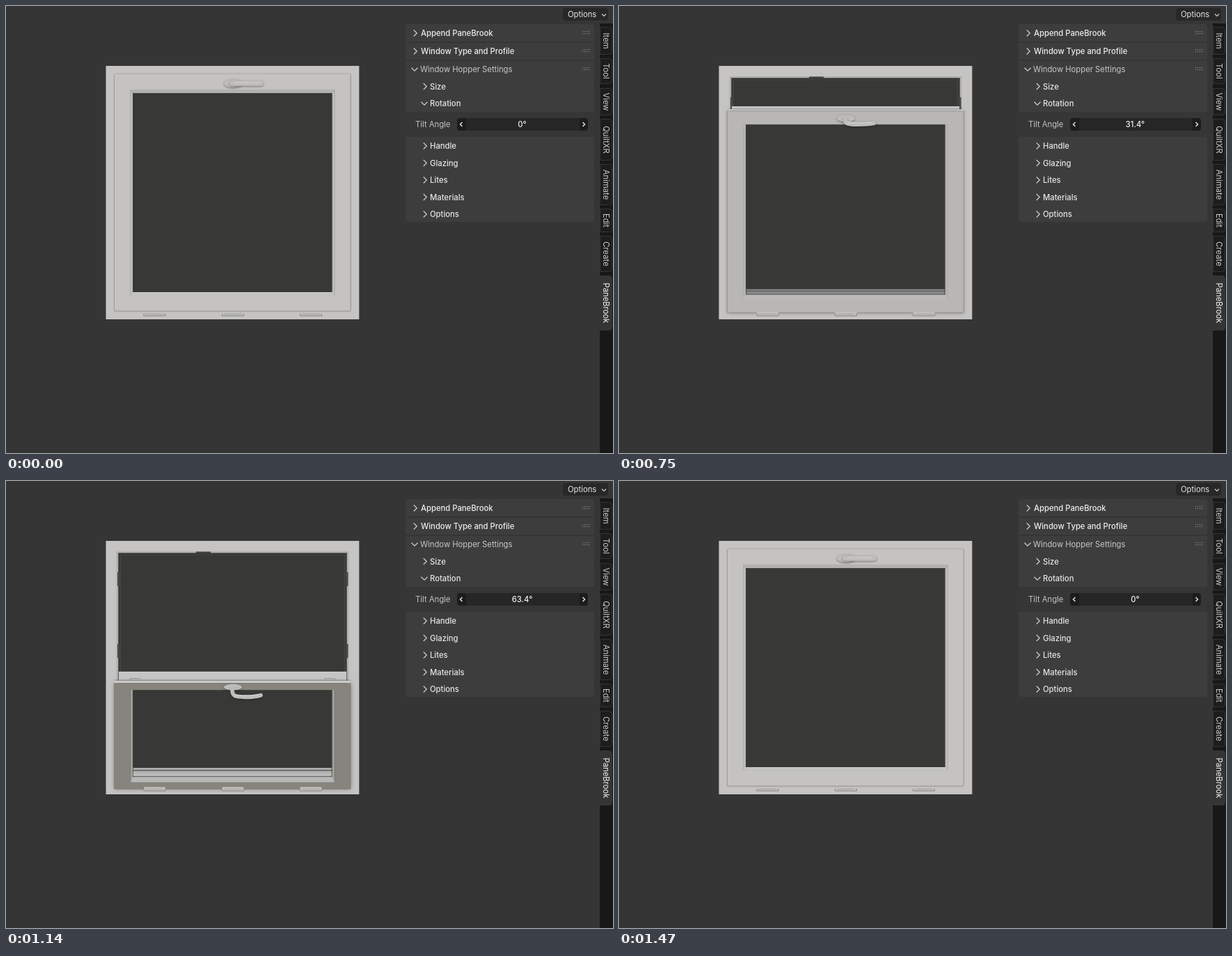
An HTML page with a canvas that plays this animation: 872x642 px, repeating every 1590 ms.

```html
<!DOCTYPE html>
<html lang="en">
<head>
<meta charset="utf-8">
<title>Hopper window tilt</title>
<style>
  html, body { margin: 0; width: 100%; height: 100%; overflow: hidden; background: #353535; }
  canvas { display: block; }
</style>
</head>
<body>
<canvas id="stage" width="872" height="642"></canvas>
<script>
const ctx = document.getElementById('stage').getContext('2d');
const LOOP = 1590, STEP = 30;
const BG = '#353535', VOID = '#383836', PANEL = '#3d3d3d';

// Tilt in degrees over time: [ms, angle]
const KEYS = [[545, 0], [600, 5.52], [840, 46.2], [990, 60.5],
              [1100, 64], [1140, 63.4], [1320, 40.4], [1470, 0]];

function slope(i) {
  if (i === 0) return 0.06;
  if (i === KEYS.length - 1) return -0.3;
  const [t0, a0] = KEYS[i - 1], [t1, a1] = KEYS[i], [t2, a2] = KEYS[i + 1];
  const s0 = (a1 - a0) / (t1 - t0), s1 = (a2 - a1) / (t2 - t1);
  return (s0 * (t2 - t1) + s1 * (t1 - t0)) / (t2 - t0);
}

function tiltAt(ms) {
  const last = KEYS.length - 1;
  if (ms <= KEYS[0][0] || ms >= KEYS[last][0]) return 0;
  const i = KEYS.findIndex(k => k[0] > ms) - 1;
  const [t0, a0] = KEYS[i], [t1, a1] = KEYS[i + 1];
  const d = t1 - t0, u = (ms - t0) / d, v = 1 - u;
  return a0 * (1 + 2 * u) * v * v + slope(i) * d * u * v * v
       + a1 * u * u * (3 - 2 * u) - slope(i + 1) * d * u * u * v;
}

const grey = (v, warm = 2) => `rgb(${v},${v - warm / 4},${v - warm})`;
const ramp = (v, from, to) => Math.min(1, Math.max(0, (v - from) / (to - from)));

function box(x0, y0, x1, y1, fill) {
  if (y1 <= y0) return;
  ctx.fillStyle = fill;
  ctx.fillRect(x0, y0, x1 - x0, y1 - y0);
}

function round(x0, y0, x1, y1, radii, fill, line) {
  ctx.beginPath();
  ctx.roundRect(x0, y0, x1 - x0, y1 - y0, radii);
  ctx.fillStyle = fill;
  ctx.fill();
  if (line) { ctx.strokeStyle = line; ctx.lineWidth = 1; ctx.stroke(); }
}

function poly(fill, ...points) {
  ctx.beginPath();
  points.forEach(p => ctx.lineTo(...p));
  ctx.fillStyle = fill;
  ctx.fill();
}

function path(color, width, ...points) {
  ctx.beginPath();
  points.forEach(p => ctx.lineTo(...p));
  ctx.strokeStyle = color;
  ctx.lineWidth = width;
  ctx.stroke();
}

function text(label, x, y, { color = '#e6e6e6', weight = 400, align = 'left' } = {}) {
  ctx.font = `${weight} 11.25px Inter, sans-serif`;
  ctx.textAlign = align;
  ctx.textBaseline = 'alphabetic';
  ctx.fillStyle = color;
  ctx.fillText(label, x, y + 4);
}

// Chevron pointing right (turn 0), down (1) or left (2)
function chevron(x, y, turn, size, color = '#d0d0d0', width = 1.2) {
  ctx.save();
  ctx.translate(x, y);
  ctx.rotate(turn * Math.PI / 2);
  path(color, width, [-size / 2, -size], [size / 2, 0], [-size / 2, size]);
  ctx.restore();
}

function drawTabs() {
  box(853, 25, 872, 642, '#181818');
  const tabs = [['Item', 30, 70], ['Tool', 75, 112], ['View', 118, 157], ['QuiltXR', 162, 222],
                ['Animate', 227, 286], ['Edit', 291, 325], ['Create', 330, 382], ['PaneBrook', 387, 466]];
  for (const [label, top, bottom] of tabs) {
    const active = bottom === 466;
    round(853.5, top + 0.5, 870.5, bottom - 0.5, [0, 4, 4, 0], active ? BG : '#1d1d1d', active ? BG : '#343434');
    ctx.save();
    ctx.translate(861.5, (top + bottom) / 2);
    ctx.rotate(Math.PI / 2);
    text(label, 0, 0, { align: 'center', color: active ? '#f4f4f4' : '#cccccc' });
    ctx.restore();
  }
}

function drawHeader(label, y, open) {
  chevron(open ? 587 : 588, y, open ? 1 : 0, 4.5);
  text(label, open ? 595 : 596, y, open ? { color: '#c8c8c8' } : { weight: 500, color: '#ededed' });
  for (let i = 0; i < 8; i++) {
    const x = 828 + (i % 4) * 3, row = y - 3 + (i >> 2) * 3;
    box(x, row, x + 1.2, row + 1.2, '#8a8a8a');
  }
}

function drawPanel(angle) {
  round(800, 3, 865, 21, 4, '#282828');
  text('Options', 807, 12);
  chevron(859, 13, 1, 3);

  round(574, 26, 845, 51, [4, 4, 0, 0], PANEL);
  box(574, 53, 845, 77, PANEL);
  round(574, 79, 845, 310, [0, 0, 4, 4], PANEL);
  box(574, 152, 845, 188, '#363636');
  drawHeader('Append PaneBrook', 39, false);
  drawHeader('Window Type and Profile', 65, false);
  drawHeader('Window Hopper Settings', 91, true);

  const rows = [['Size', 115.5], ['Rotation', 140], ['Handle', 201], ['Glazing', 225.5],
                ['Lites', 250], ['Materials', 274.5], ['Options', 299]];
  for (const [label, y] of rows) {
    const open = label === 'Rotation';
    chevron(open ? 601 : 602, y, open ? 1 : 0, 4.5);
    text(label, 609, y, { weight: 500 });
  }

  text('Tilt Angle', 588, 169.5, { color: '#c4c4c4' });
  round(648, 161, 836, 179, 4, '#1c1c1c');
  box(661, 161, 824, 179, '#262626');
  chevron(654, 170, 2, 3, '#e0e0e0', 1.5);
  chevron(830, 170, 0, 3, '#e0e0e0', 1.5);
  text(Number(angle.toPrecision(3)) + '°', 741.5, 169.5, { align: 'center', color: '#f0f0f0', weight: 500 });
}

function drawFrame() {
  box(143.5, 86, 507.3, 450, '#c5c4c2');
  box(158.5, 101, 492.5, 430, '#b2b1af');
  box(161, 103, 490, 430, '#5e5e5c');
  box(162, 104, 489, 430, '#353534');
  box(163.5, 105.5, 487.5, 430, '#454543');
  box(165, 106.5, 486, 430, VOID);
  box(273, 101.5, 294, 104.5, '#3f3f3e');
  for (const y of [131, 234]) {
    box(160, y, 163, y + 20, '#4a4a49');
    box(488.5, y, 491.5, y + 20, '#4a4a49');
  }
}

function drawHinges() {
  for (const x of [198, 310.5, 422.5]) {
    round(x, 439.5, x + 31, 445, 1, '#c0bfbd');
    path('#858482', 1, [x, 442], [x, 445], [x + 31, 445], [x + 31, 442]);
    path('#a5a4a2', 1, [x + 3, 442.5], [x + 28, 442.5]);
  }
}

function drawHandle(y, open) {
  const base = y(327, 0), lever = y(327, -14.5);
  const start = base + (lever - base) * 0.35;
  ctx.save();
  ctx.shadowColor = 'rgba(0,0,0,0.4)';
  ctx.shadowBlur = 3;
  ctx.shadowOffsetY = 1;
  ctx.fillStyle = '#bdbcba';
  ctx.beginPath();
  ctx.ellipse(326, base, 13, 6 - 1.7 * open, 0, 0, 2 * Math.PI);
  ctx.fill();

  ctx.beginPath();
  ctx.moveTo(325, start);
  ctx.bezierCurveTo(325, lever + open, 331, lever + open, 344, lever + 1.5 * open);
  ctx.quadraticCurveTo(358, lever + 1.5 * open, 366, lever - 1.5 * open);
  ctx.lineCap = ctx.lineJoin = 'round';
  ctx.lineWidth = 7.5 - 2 * open;
  ctx.strokeStyle = '#bebdbb';
  ctx.stroke();
  ctx.restore();

  ctx.beginPath();
  ctx.moveTo(328, lever - 1);
  ctx.quadraticCurveTo(347, lever + open - 1, 364, lever - 1.5 * open - 1);
  ctx.strokeStyle = '#cccbc9';
  ctx.lineWidth = 1.5;
  ctx.stroke();
}

function drawSash(angle) {
  const c = Math.cos(angle * Math.PI / 180), s = Math.sin(angle * Math.PI / 180);
  // Screen height of a point: up along the sash, deep behind its front face
  const y = (up, deep) => 438 - up * c + (5 - deep) * s;
  const shade = 196 - 62 * ((1 - c) / 0.552) ** 1.25;
  const warm = 3 + 10 * (1 - c);
  const steep = ramp(s, 0.78, 0.9);
  const top = y(340, 0), lip = y(340, 4), back = y(334, 21.3), bottom = y(0, 0);

  // Top edge of the tilted sash
  if (back < lip) {
    box(162, back, 489, lip, '#c5c5c6');
    box(162, back, 489, back + 1, '#d6d6d6');
    ctx.globalAlpha = steep;
    for (const x of [177, 457]) path('#92918f', 1, [x, lip - 1.5], [x + 1, lip - 3], [x + 15, lip - 3], [x + 16, lip - 1.5]);
    ctx.globalAlpha = 1;
    box(156, lip - 1, 495, lip, `rgba(90,90,88,${0.3 + 0.4 * steep})`);
  }

  ctx.save();
  ctx.shadowColor = `rgba(0,0,0,${0.25 + 0.15 * s})`;
  ctx.shadowBlur = 3 + 4 * s;
  box(155.5, top, 495, bottom, grey(shade, warm));
  ctx.restore();
  box(155.5, lip, 495, top, '#cbcbca');
  box(155.5, top, 495, top + 1, `rgba(70,70,68,${0.3 * s})`);
  path('rgba(110,109,107,0.4)', 1, [155.5, top], [155.5, bottom], [495, bottom], [495, top]);

  // Bevel around the opening
  const outTop = y(318, 0), outBottom = y(22.5, 0);
  const holeTop = Math.max(outTop, y(313, 6)), inner = y(27, 6), sill = y(27, 20.5);
  const edge = `rgba(100,99,97,${0.25 * (1 - s) + 0.35 * steep})`;
  box(179, outTop, 472, outBottom, grey(shade - 4 * (1 - s) + 30 * steep, warm));
  box(179, outTop, 472, holeTop, '#b3b2b0');
  poly(grey(194 - 12 * s), [182, inner], [468.5, inner], [472, outBottom], [179, outBottom]);
  path(edge, 1, [179, outTop], [179, outBottom]);
  path(edge, 1, [472, outTop], [472, outBottom]);

  box(182, holeTop, 468.5, inner, VOID);
  if (sill < inner) {
    const band = (from, to, v) => box(182, sill + (inner - sill) * from, 468.5, sill + (inner - sill) * to, grey(v, 0));
    const lit = 50 * ramp(s, 0.65, 0.9);
    band(0, 1, 125 + lit);
    band(0, 0.18, 150 + lit / 2);
    band(0.22, 0.32, 80);
    band(0.55, 0.85, 138 + lit);
    band(0.92, 1, 100);
  } else {
    box(182, inner, 468.5, inner + 1, '#d0cfcd');
  }
  path('rgba(70,70,68,0.7)', 1, [182.5, inner], [182.5, holeTop + 0.5], [468, holeTop + 0.5], [468, inner]);

  drawHinges();
  drawHandle(y, s);
}

function draw(now) {
  const ms = Math.floor((now % LOOP) / STEP) * STEP;
  const angle = tiltAt(ms);
  box(0, 0, 872, 642, BG);
  drawFrame();
  drawSash(angle);
  drawPanel(angle);
  drawTabs();
}

let began;
function tick(now) {
  began ??= now;
  draw(now - began);
  requestAnimationFrame(tick);
}
requestAnimationFrame(tick);
</script>
</body>
</html>
```
